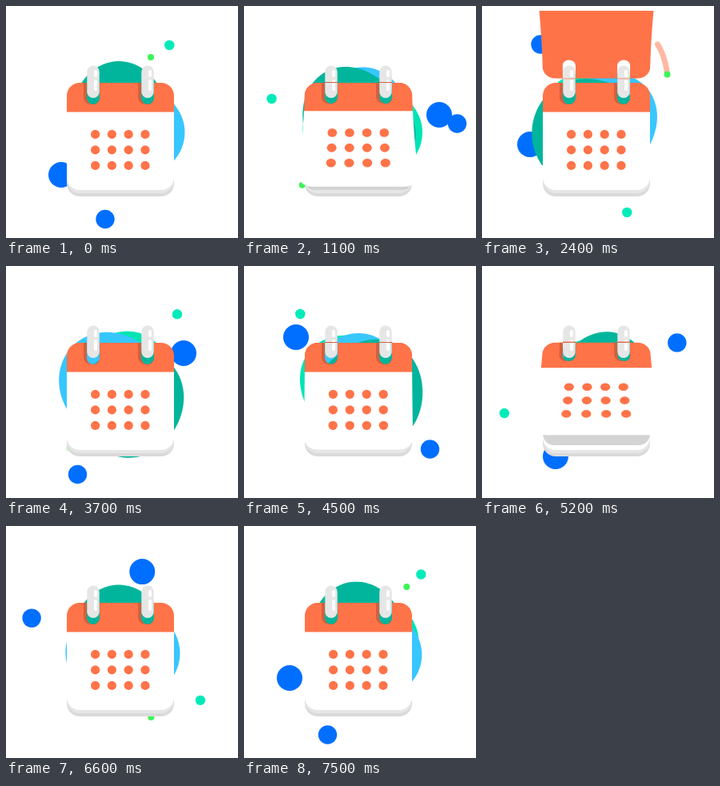
These frames come from a looping animation (290 px wide and 290 px high, 7600 ms). An HTML page with a canvas:

```html
<!DOCTYPE html>
<html lang="en">
<head>
<meta charset="utf-8">
<title>Calendar</title>
<style>
html, body { margin: 0; width: 100%; height: 100%; overflow: hidden; background: #fff; }
canvas { display: block; width: 290px; height: 290px; }
</style>
</head>
<body>
<canvas id="stage"></canvas>
<script>
const LOOP = 7600, STEP = 100, FLIP = LOOP / 2;
const ORANGE = '#ff7349', SHADE = '#d45f3d';
const canvas = document.getElementById('stage');
const ctx = canvas.getContext('2d');
const dpr = window.devicePixelRatio || 1;
canvas.width = canvas.height = 290 * dpr;

const rad = d => d * Math.PI / 180;
const clamp = x => Math.max(0, Math.min(1, x));
const wrap = a => a - 360 * Math.round(a / 360);

// Linear interpolation of rows [time, value, value, ...]
function sample(rows, t) {
  if (t <= rows[0][0]) return rows[0].slice(1);
  for (let i = 1; i < rows.length; i++) {
    const a = rows[i - 1], b = rows[i];
    if (t <= b[0]) {
      const f = (t - a[0]) / (b[0] - a[0]);
      return a.slice(1).map((v, j) => v + (b[j + 1] - v) * f);
    }
  }
  return rows[rows.length - 1].slice(1);
}

function disc(x, y, r, color) {
  ctx.fillStyle = color;
  ctx.beginPath();
  ctx.arc(x, y, r, 0, 2 * Math.PI);
  ctx.fill();
}

// ---- Orbiting dots: steady rotation plus a small drift through way points
const TIMES = [0, 1100, 2400, 3700, 4500, 5800, 7500, LOOP];

function makeDot(color, r, cx, cy, turns, points) {
  const rate = -360 * turns / LOOP;
  const polar = TIMES.map((t, i) => {
    const [x, y] = points[i % points.length];
    const angle = Math.atan2(y - cy, x - cx) * 180 / Math.PI;
    return [t, angle, Math.hypot(x - cx, y - cy)];
  });
  const start = polar[0][1];
  const drift = polar.map(([t, a, d]) => [t, wrap(a - start - rate * t), d]);
  return t => {
    const [off, dist] = sample(drift, t);
    const a = rad(start + rate * t + off);
    disc(cx + dist * Math.cos(a), cy + dist * Math.sin(a), r, color);
  };
}

const bigDot = makeDot('#006fff', 16, 145, 152, 3,
  [[69, 211], [244, 136], [60, 173], [222, 109], [65, 89], [223, 215], [57, 190]]);
const midDot = makeDot('#006fff', 11.7, 141, 147, 2,
  [[124, 266.5], [266.5, 147], [73, 48], [89.5, 260.5], [232.5, 229], [150.5, 39.5], [104.5, 261]]);
const tealDot = makeDot('#00ebb9', 6.2, 142, 152, 2,
  [[204.3, 49], [34.6, 116], [181.3, 258], [214, 60.3], [70.3, 60], [108.5, 267.3], [221.3, 60.5]]);
const limeDot = makeDot('#3cf455', 4, 142, 150, 3,
  [[181, 64], [72.8, 223.7], [231.5, 85.5], [79, 228], [236, 176], [45, 167.5], [203.3, 76]]);
const limeAlpha = [[0, 1], [2500, 1], [3700, 0.3], [4200, 0], [5400, 0], [5800, 0.27], [6400, 1]];

// ---- Blobs: [time, lobe angle, lobe size, lobe angle, lobe size, notch]
const mint = [
  [0, -25, 12, -170, 0, 0], [1100, 0, 18, -170, 8, 0], [2400, -30, 5, -125, 17, 0],
  [3700, -70, 16, -130, 0, 0], [4500, -138, 18, -30, 0, 0], [5800, -138, 0, -30, 0, 0],
  [7500, -138, 0, -30, 17, 0], [LOOP, -138, 0, -25, 12, 0]];
const sky = [
  [0, 0, 18.5, -122, 0, 0], [1100, -80, 20, -122, 0, 0], [2400, -42, 22, -122, 0, 0],
  [3700, -165, 10, -122, 15, 0], [4500, -180, 0, -90, 12, 0], [5800, -180, 12.5, 0, 8, 0],
  [7500, -180, 0, 6, 17.5, 0], [LOOP, -180, 0, 0, 18.5, 0]];
const jade = [
  [0, -93, 27, 10, 0, 0], [1100, -118, 24, 10, 10, 0], [2400, -145, 13, 150, 15, 0],
  [3700, -285, 20, 0, 15, -14], [4500, -322, 16, -38, 16, -10], [5800, -340, 0, -93, 19, 0],
  [7500, -360, 0, -94, 26.5, 0], [LOOP, -360, 0, -93, 27, 0]];

const lobe = d => Math.pow((1 + Math.cos(rad(d))) / 2, 5);

function blob(rows, color, t) {
  const [a, sizeA, b, sizeB, notch] = sample(rows, t);
  ctx.fillStyle = color;
  ctx.beginPath();
  for (let d = 0; d < 360; d += 3) {
    const r = 62 + sizeA * lobe(d - a) + sizeB * lobe(d - b) + notch * lobe(d + 130);
    ctx.lineTo(143 + r * Math.cos(rad(d)), 158 + r * Math.sin(rad(d)));
  }
  ctx.fill();
}

// ---- Calendar sheet, drawn flat or bent around its top edge
function roundBox(x, y, w, h, top, bottom) {
  const pts = [];
  const corner = (cx, cy, r, from) => {
    for (let i = 0; i <= 8; i++) {
      const a = rad(from + i * 11.25);
      pts.push([cx + r * Math.cos(a), cy + r * Math.sin(a)]);
    }
  };
  const side = (sx, y0, y1) => {
    for (let i = 1; i < 10; i++) pts.push([sx, y0 + (y1 - y0) * i / 10]);
  };
  corner(x + top, y + top, top, 180);
  corner(x + w - top, y + top, top, 270);
  side(x + w, y + top, y + h - bottom);
  corner(x + w - bottom, y + h - bottom, bottom, 0);
  corner(x + bottom, y + h - bottom, bottom, 90);
  side(x, y + h - bottom, y + top);
  return pts;
}

const FLAT = { hinge: 96, k: 1, bend: 0 };
const HOLES = [109, 177];
const holes = HOLES.map(x => roundBox(x - 8, -1, 16, 28, 0, 8));
const slots = HOLES.map(x => roundBox(x - 12, 0, 20, 27, 0, 9));
const head = roundBox(76, 0, 134, 36.5, 16, 0);
const paper = roundBox(76, 36, 134, 98, 0, 16);
const sheet = roundBox(76, 0, 134, 134, 16, 16);

const widen = (pose, v) => 1 + pose.bend * Math.pow(Math.max(0, v) / 103, 1.7);
const place = (pose, x, v) => [143 + (x - 143) * widen(pose, v), pose.hinge + pose.k * v];

function fillShapes(pose, shapes, color) {
  ctx.fillStyle = color;
  ctx.beginPath();
  for (const pts of shapes) {
    pts.forEach(([x, v], i) => {
      const p = place(pose, x, v);
      if (i) ctx.lineTo(...p); else ctx.moveTo(...p);
    });
    ctx.closePath();
  }
  ctx.fill('evenodd');
}

function drawSheet(pose) {
  if (pose.k < 0) {
    fillShapes(pose, [sheet, ...holes], ORANGE);
    return;
  }
  fillShapes(pose, [paper], '#fff');
  fillShapes(pose, [head, ...holes], ORANGE);
  slots.forEach((slot, i) => fillShapes(pose, [slot, holes[i]], SHADE));
  ctx.fillStyle = ORANGE;
  for (let row = 0; row < 3; row++) {
    for (let col = 0; col < 4; col++) {
      const v = 64.4 + row * 19.5;
      const [x, y] = place(pose, 111.6 + col * 20.8, v);
      ctx.beginPath();
      ctx.ellipse(x, y, 5.6 * Math.min(1.1, widen(pose, v)), 5.6 * pose.k, 0, 0, 2 * Math.PI);
      ctx.fill();
    }
  }
}

function bar(x, y, w, h, color) {
  ctx.fillStyle = color;
  ctx.beginPath();
  ctx.roundRect(x, y, w, h, w / 2);
  ctx.fill();
}

function drawRing(x) {
  bar(x - 7.7, 74.5, 15.4, 40.5, '#e6e6e6');
  bar(x + 1, 80, 4, 9, '#fff');
  bar(x + 1, 92, 4, 14, '#fff');
}

// [time, angle, hinge y, bend, shadow height]
const flip = [
  [500, 0, 96, 0, 134], [800, 4, 96, 0.02, 134], [1100, 14.4, 96, 0.09, 134],
  [1600, 41, 95.5, 0.27, 124], [2000, 74, 94, 0.48, 100], [2200, 110, 92.5, 0.38, 50],
  [2400, 148, 90.5, 0.07, 0], [2500, 160, 76, 0.05, 0], [2600, 168, 48, 0.04, 0],
  [2750, 175, -10, 0.03, 0]];

// Motion line beside the turning sheet
function swoosh(u) {
  const tail = clamp((u - 2180) / 440), tip = clamp((u - 2100) / 240);
  if (tip <= tail) return;
  const curve = (a, b, c, s) => (1 - s) * (1 - s) * a + 2 * s * (1 - s) * b + s * s * c;
  ctx.strokeStyle = 'rgba(255,115,73,.5)';
  ctx.lineWidth = 7;
  ctx.lineCap = ctx.lineJoin = 'round';
  ctx.beginPath();
  for (let i = 0; i <= 20; i++) {
    const s = tail + (tip - tail) * i / 20;
    ctx.lineTo(curve(229, 238, 219.5, s), curve(128, 78, 48, s));
  }
  ctx.stroke();
}

function draw(t) {
  const u = t % FLIP;
  const [angle, hinge, bend, shadow] = sample(flip, u);
  ctx.setTransform(dpr, 0, 0, dpr, 0, 0);
  ctx.fillStyle = '#fff';
  ctx.fillRect(0, 0, 290, 290);

  bigDot(t);
  midDot(t);
  tealDot(t);
  swoosh(u);
  ctx.globalAlpha = sample(limeAlpha, t)[0];
  limeDot(t);
  ctx.globalAlpha = 1;

  blob(mint, '#00e4b4', t);
  blob(sky, '#38c6ff', t);
  blob(jade, '#00b59b', t);

  fillShapes(FLAT, [roundBox(76, 90, 134, 52, 0, 16)], '#dadada');
  fillShapes(FLAT, [roundBox(76, 90, 134, 48, 0, 16)], '#e6e6e6');
  drawSheet(FLAT);

  const turning = angle > 0.5 && u < 2750;
  if (turning && shadow > 34) {
    const shape = roundBox(76, 0, 134, shadow, 16, 14);
    fillShapes(FLAT, [shape, ...holes], 'rgba(0,0,0,.17)');
  }
  HOLES.forEach(drawRing);
  if (turning) {
    ctx.save();
    ctx.beginPath();
    ctx.rect(0, 6, 290, 284);
    ctx.clip();
    drawSheet({ hinge, k: Math.cos(rad(angle)), bend });
    ctx.restore();
  }
}

const begin = performance.now();
function tick() {
  const t = (performance.now() - begin) % LOOP;
  draw(Math.floor(t / STEP) * STEP);
  requestAnimationFrame(tick);
}
tick();
</script>
</body>
</html>
```
